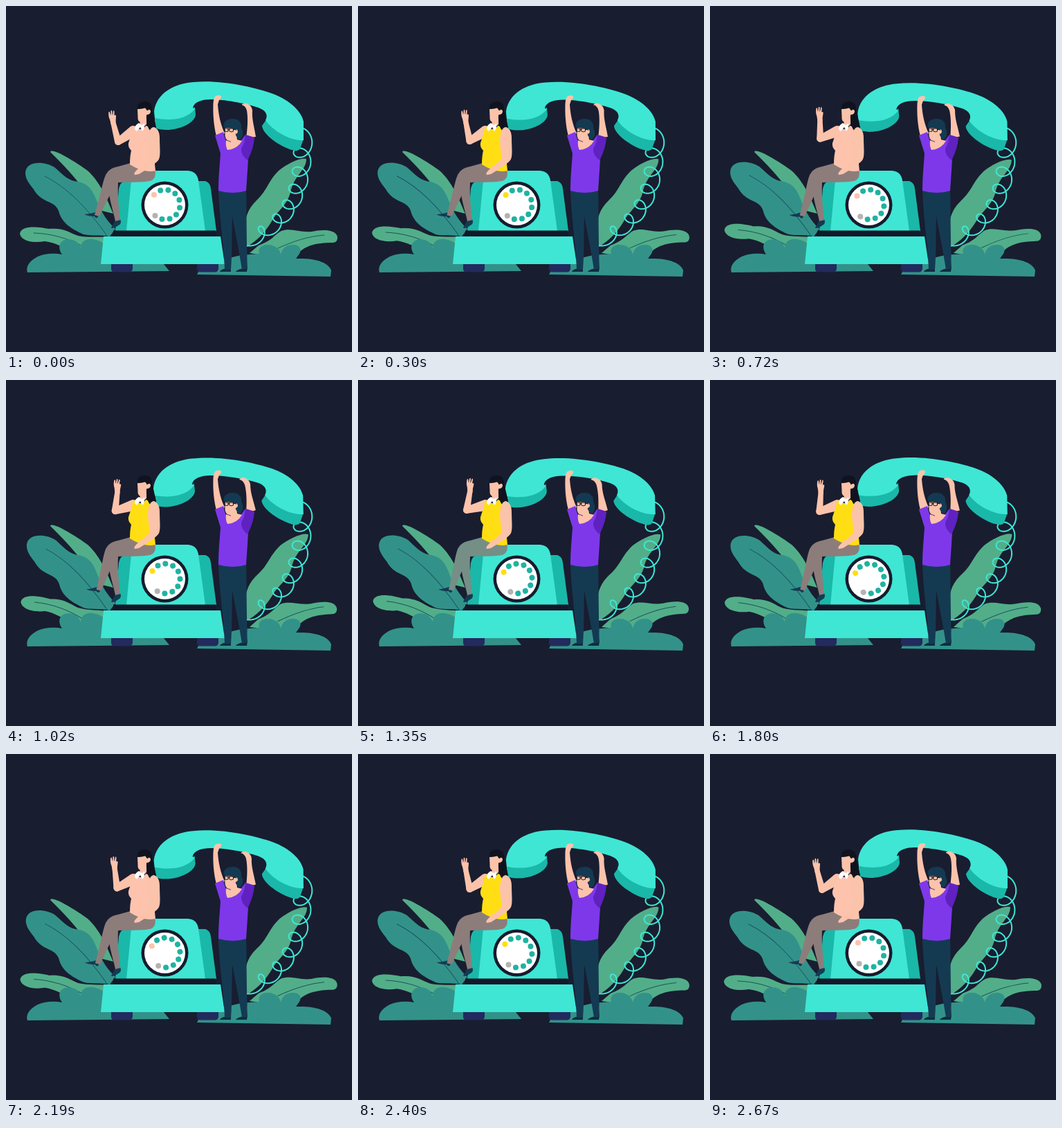
An HTML page for the animation above (2.7 s loop, 500x500 px).

```html
<!DOCTYPE html>
<html>
<head>
<meta charset="utf-8">
<style>
html, body { margin: 0; width: 100%; height: 100%; overflow: hidden; background: #191d30; }
svg { display: block; width: 100vw; height: 100vh; }
</style>
</head>
<body>
<svg id="stage" viewBox="0 0 500 500"></svg>
<script>
(() => {
const NS = 'http://www.w3.org/2000/svg';
const stage = document.getElementById('stage');
const BG = '#191d30', TEAL = '#3fe6d4', DEEP = '#1ab8a9', LEAF = '#52ae89', BUSH = '#32928a',
  NAVY = '#143a52', SKIN = '#fcc3ab', PINK = '#fdc3ad', YELLOW = '#ffde14', HAIR = '#10131f',
  VIOLET = '#7e38ea', PLUM = '#5f22c0', VEIN = '#1c5560', WHEEL = '#232a5e';

function el(parent, tag, attrs) {
  const e = document.createElementNS(NS, tag);
  for (const k in attrs) e.setAttribute(k, attrs[k]);
  parent.appendChild(e);
  return e;
}
const group = (parent = stage) => el(parent, 'g', {});
const path = (parent, d, fill) => el(parent, 'path', { d, fill });
const line = (parent, d, stroke, w = 1) =>
  el(parent, 'path', { d, stroke, fill: 'none', 'stroke-width': w, 'stroke-linecap': 'round' });
const dot = (parent, cx, cy, r, fill) => el(parent, 'circle', { cx, cy, r, fill });
const mix = (a, b, k) => a + (b - a) * k;

// Tapered limb with round ends.
function limb(x1, y1, r1, x2, y2, r2) {
  const a = Math.atan2(y2 - y1, x2 - x1), nx = -Math.sin(a), ny = Math.cos(a);
  return `M${x1 + nx * r1} ${y1 + ny * r1}A${r1} ${r1} 0 0 1 ${x1 - nx * r1} ${y1 - ny * r1}` +
    `L${x2 - nx * r2} ${y2 - ny * r2}A${r2} ${r2} 0 0 1 ${x2 + nx * r2} ${y2 + ny * r2}Z`;
}

// Coil: a circling pen carried along a Bezier curve.
function cord() {
  const bez = (a, b, c, d, s) => {
    const u = 1 - s;
    return u * u * u * a + 3 * u * u * s * b + 3 * u * s * s * c + s * s * s * d;
  };
  let d = '';
  for (let i = 0; i <= 280; i++) {
    const s = i / 280, a = -1.6 + s * 7.2 * Math.PI * 2, r = mix(13.5, 9.5, s);
    const x = bez(429, 429, 418, 333, s) + r * Math.cos(a);
    const y = bez(190, 262, 315, 346, s) + r * Math.sin(a);
    d += (i ? 'L' : 'M') + x.toFixed(1) + ' ' + y.toFixed(1);
  }
  return d;
}

// Foliage, left
path(stage, 'M64 211C66 204 100 225 118 238C138 256 148 285 155 300L135 295C112 262 90 236 64 211Z', LEAF);
const bigLeft = group();
path(bigLeft, 'M28 241C29 223 56 224 70 233C84 245 90 253 105 254C135 261 124 290 158 322L150 333' +
  'C138 330 124 333 112 330C94 322 80 313 76 296C70 280 52 286 40 265C33 256 28 250 28 241Z', BUSH);
line(bigLeft, 'M56 246C88 262 116 290 146 332', VEIN);
const smallLeft = group();
path(smallLeft, 'M20 329C22 316 48 319 62 322C84 320 92 328 104 332C118 335 134 333 150 334V356H100' +
  'C82 349 72 342 56 340C40 343 22 340 20 329Z', LEAF);
line(smallLeft, 'M40 328C66 329 88 335 112 348', VEIN);
path(stage, 'M31 385C28 377 34 368 46 362C58 357 70 357 81 359C75 351 76 341 85 338C96 335 106 341 108 350' +
  'C108 340 116 336 125 337C133 338 140 341 144 347L228 373L236 383Z', BUSH);

// Foliage, right, and the cord
const bigRight = group();
path(bigRight, 'M434 221C434 238 416 244 411 270C406 288 392 296 384 311C374 328 362 340 345 350L344 325' +
  'C346 305 349 294 362 281C378 266 378 254 394 238C406 228 426 218 434 221Z', LEAF);
line(stage, cord(), TEAL, 2);
const smallRight = group();
path(smallRight, 'M479 334C477 322 456 323 442 326C424 328 412 320 398 325C386 332 386 338 365 346L352 357' +
  'L385 362H418C430 346 448 342 472 342C478 342 479 338 479 334Z', LEAF);
line(smallRight, 'M460 331C436 333 415 340 393 350', VEIN);
path(stage, 'M276 388L284 373L340 360L366 358C363 350 370 344 380 345C390 346 396 352 397 359C399 350 405 345 415 345' +
  'C424 345 428 351 424 358L419 365C446 364 466 370 470 382L469 391Z', BUSH);

// Telephone
const wheel = 'M0 372H31V380Q30 384.500 26 384.500H5Q0 384.500 0 380Z';
path(stage, wheel, WHEEL).setAttribute('transform', 'translate(152 0)');
path(stage, wheel, WHEEL).setAttribute('transform', 'translate(276 0)');
path(stage, 'M158 325L163 264Q165 253 174 253H288Q295 255 296 264L304 325Z', DEEP);
path(stage, 'M174 325L181 252Q182 238 195 238H263Q276 239 278 252L288 325Z', TEAL);
path(stage, 'M155 324.500H303V333H155Z', '#131829');
path(stage, 'M141 333H310L316 373H137Z', TEAL);
dot(stage, 229.5, 287.5, 34, '#171b2d');
dot(stage, 229.5, 287.5, 29.5, '#fff');
const dial = group();
const holes = [];
for (let i = 0; i < 10; i++) {
  const a = (221.5 + 30.1 * i) * Math.PI / 180;
  holes.push(dot(dial, 230 + 21.5 * Math.cos(a), 287 + 21.5 * Math.sin(a), 4, i == 9 ? '#b3b3b3' : '#20b2a2'));
}

// Handset
const handset = group();
path(handset, 'M215 160Q250 164 273 146L274 157C273 169 251 179 232 179Q222 179 215 176Z', DEEP);
path(handset, 'M377 163L370 173C371 186 396 203 413 208Q422 211 425 206L430 192Z', DEEP);
path(handset, 'M214 152C218 125 244 112 271 110C311 106 362 118 386 127C410 136 427 152 430 167L430 194' +
  'C411 195 386 181 375 165C379 158 376 151 365 147C345 140 314 135 296 135C284 135 272 138 270 147' +
  'L273 149C260 165 236 166 215 162Z', TEAL);

// Seated woman
path(stage, 'M190 148C189 141 196 137 203 138C211 140 212 147 211 154C214 165 219 176 217 186L203 182L200 150Z', HAIR);
const upperArm = path(stage, '', SKIN);
const foreArm = path(stage, '', SKIN);
const hand = group();
path(hand, 'M152 172L150 164C148 160 148 155 148.500 153Q149.500 152 150.300 154L151 157L151.500 151.500Q152.700 150 153.400 152' +
  'L154 157L155 151.500Q156.200 150.500 156.600 152.500L156.500 158Q158 157 159 158.500C159 163 158 167 159 171Z', SKIN);
line(hand, 'M151 157L151 153M153.800 157L154.200 152.500', BG, .6);
path(stage, 'M152 320Q155 316 157.500 310L165.500 309Q167 314 164 316Q157 321 153 321Z', NAVY);
const shin = group();
path(shin, 'M113 301Q123 300 129 298L135 301L132 306Q129 307 128 304Q119 304 113 301Z', NAVY);
const backLeg = path(shin, 'M145 242C140 252 139 264 128 302L135 304C145 283 151 270 160 256Z');
const frontLeg = path(stage, 'M145 243C148 236 156 233 162 232L180 227L215 236Q218 247 211 252C198 256 180 254 162 255' +
  'C161 272 163 291 165 309L158 311C155 296 149 280 148 262Z');
const vest = path(stage, 'M184 173C191 180 199 179 202 173L214 177C217 186 214 198 213 210L216 238Q199 242 179 229' +
  'Q179 217 181 209Q176 204 177 198L181 186Z');
path(stage, 'M190 149L200 147L205 150Q209 149 209 153Q208 157 204 157L203 171Q198 177 192 172L194 168Q190 166 190.500 160Z', SKIN);
path(stage, 'M190 149C191 141 200 138 207 142L206 150Q203 153 202 147Q197 149 190 149Z', HAIR);
path(stage, 'M203 157Q207 159 209 154L212 153C214 164 219 177 216 186C208 181 202 176 203 157Z', HAIR);
path(stage, 'M192 169Q186 172 186 178L189 181L194 175L197 181Q201 177 200 169Q197 175 192 169Z', '#fff');
path(stage, 'M213 175C219 176 222 182 222 191C222 205 224 218 220 223C214 230 204 234 200 238L192 243L186 244' +
  'Q184 242 188 238L194 232C200 229 205 224 208 220C206 207 204 196 206 185Q208 176 213 175Z', SKIN);

// Standing man
path(stage, 'M309 384Q310 381 317 379.500H325V384ZM332 384Q334 381 341 379.500L349 378L348 384Z', '#0f2c40');
path(stage, 'M307 266H347C348 285 347 300 349 379L341 381C337 355 332 331 327 304C326 331 327 358 325 381H316C315 345 308 305 307 266Z', NAVY);
const armR = group();
path(armR, 'M341 142Q346 139 350 142Q355 144 356 151C355 164 359 175 361 189L347 191C349 177 350 163 348 151Q346 144 341 143Z', SKIN);
const armL = group();
path(armL, 'M304 188C300 172 299 156 299.500 141Q300 132 303 130Q308 128 311 130Q312 133 308 136L306 142C307 157 310 171 316 184Z', SKIN);
path(stage, 'M302 187L314 182Q316 191 318 195L340 194L346 186L359 190L350 221C349 238 348 252 347 267Q328 273 307 267' +
  'C307 247 309 229 310 213Z', VIOLET);
path(stage, 'M346 186L359 190Q358 206 349 223Q339 215 340 206Q345 197 346 186Z', PLUM);
path(stage, 'M322 188L333 184L334 193L341 195Q334 207 320 208Q317 202 318 194L325 197Z', SKIN);
path(stage, 'M315 175C313 166 321 163 328 163C337 163 341 169 340 176C344 183 343 190 337 194L332 187L331 177Z', NAVY);
path(stage, 'M316.500 176L331 177Q335 178 335 182Q334 185 331 185Q329 195 323 195Q317 194 316.500 187Z', SKIN);
path(stage, 'M315 175Q316 167 324 166L337 171L333 178Q329 181 328 176Z', NAVY);
line(stage, 'M316 177H321V181Q318 182 316.500 181ZM323 177H328.500V181Q325 183 323 181ZM321 178H323M328 178L333 179', HAIR);

const LOOP = 2700, PEAK = 1950;
const ease = s => (1 - Math.cos(Math.PI * s)) / 2;
const turn = (g, a, x, y) => g.setAttribute('transform', `rotate(${a} ${x} ${y})`);

function wave(k) {
  const ex = mix(162, 157, k), ey = mix(196, 188, k);
  upperArm.setAttribute('d', limb(184, 181, 8, ex, ey, 5));
  foreArm.setAttribute('d', limb(ex, ey, 5, mix(155, 162, k), mix(169, 160, k), 3.6));
  hand.setAttribute('transform', `translate(${7 * k} ${-9 * k}) rotate(${9 * k} 155 168)`);
}

function draw(t) {
  const k = ease(2 * t / LOOP);
  turn(bigLeft, 1.3 * k, 150, 335);
  turn(smallLeft, 4.5 * k, 145, 345);
  turn(bigRight, 1.6 * k, 350, 340);
  turn(smallRight, -2.1 * k, 355, 360);
  turn(handset, -1.5 * k, 430, 203);
  turn(shin, -3 * k, 150, 245);
  turn(armR, -5 * k, 352, 190);
  armL.setAttribute('transform', `translate(0 ${5.6 * k}) scale(1 ${1 - .03 * k})`);
  wave(k);

  const swing = t < PEAK ? ease(t / PEAK) : ease((LOOP - t) / (LOOP - PEAK));
  turn(dial, -20 * swing, 230, 287);

  const m = Math.min(t, LOOP - t);
  const shirt = m >= 150 && m < 405 || m >= 810 ? YELLOW : PINK;
  const trousers = m >= 1170 ? '#758e86' : '#8c7d7b';
  vest.setAttribute('fill', shirt);
  holes[0].setAttribute('fill', shirt);
  backLeg.setAttribute('fill', trousers);
  frontLeg.setAttribute('fill', trousers);
}

function tick() {
  draw(performance.now() % LOOP);
  requestAnimationFrame(tick);
}
tick();
})();
</script>
</body>
</html>
```
